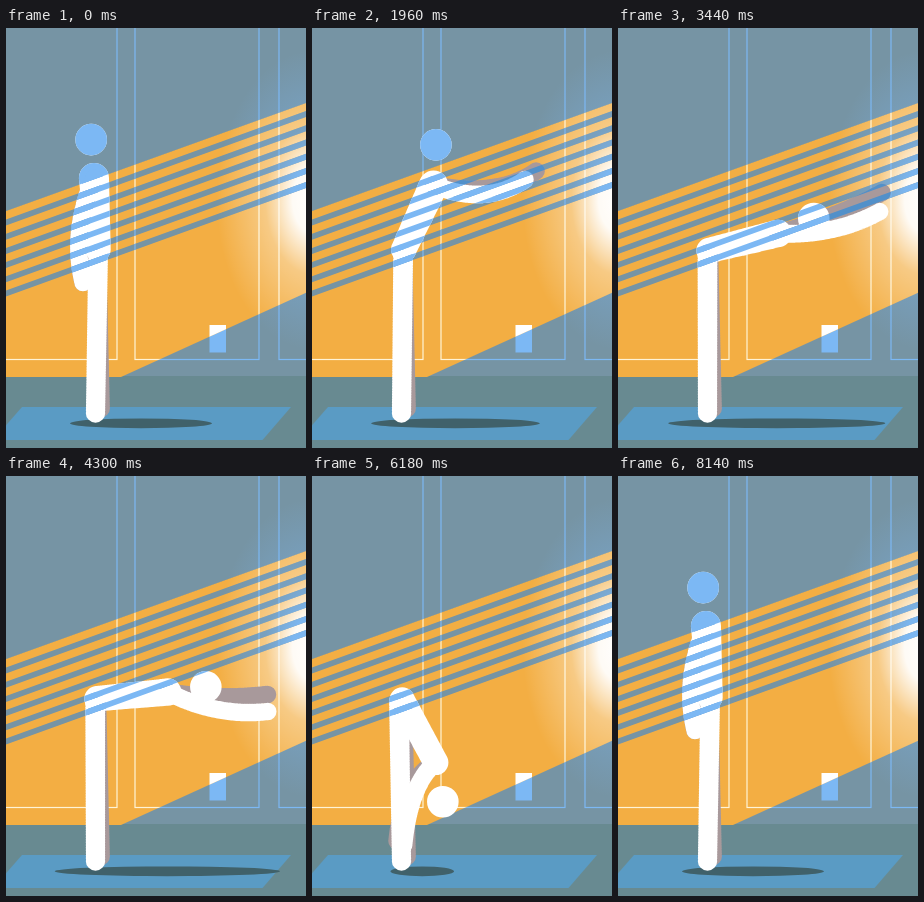
An HTML page with a canvas that plays this animation: 300x420 px, repeating every 8160 ms.

```html
<!DOCTYPE html>
<html lang="en">
<head>
<meta charset="utf-8">
<title>Forward fold</title>
<style>
html, body { margin: 0; width: 100%; height: 100%; overflow: hidden; background: #7694a4; }
canvas { display: block; width: 300px; height: 420px; }
</style>
</head>
<body>
<canvas id="stage" width="300" height="420"></canvas>
<script>
const ctx = document.getElementById('stage').getContext('2d');
const LOOP = 8160;
const LIT = { wall: '#f3ae43', line: '#fff3d6', front: '#ffffff', back: '#a8999b', glow: '255,255,255' };
const SHADE = { wall: '#7694a4', line: '#7cb8f4', front: '#7cb8f4', back: '#5290c9', glow: '124,184,244' };

// Angles run clockwise from straight up; far is how much the other arm shows
const stand = { torso: -3.3, head: -3.6, elbow: 203, bend: 59, hand: 186, arm: 105, far: 0, shadow: 206 };
const prayer = { torso: 2.5, head: 0, elbow: 230, bend: 53, hand: 189, arm: 70, far: 0, shadow: 211 };
const raise = { torso: 44, head: 32, elbow: 1, bend: 60, hand: -10, arm: 112, far: 27, shadow: 242 };
const table = { torso: 84.6, head: 83.8, elbow: 117, bend: 56, hand: 101, arm: 102, far: 17, shadow: 274 };
const fold = { torso: 135, head: 141.3, elbow: 234, bend: 44, hand: 203, arm: 91, far: 6, shadow: 189 };
const deep = { torso: 153, head: 159.5, elbow: 231, bend: 32, hand: 201, arm: 88, far: 8, shadow: 138 };
const keys = [
  [0, stand], [1400, prayer], [2500, raise], [2700, raise], [3750, table], [4300, table],
  [5160, fold], [6500, deep], [7270, deep], [8080, stand], [LOOP, stand]
];

// Monotone cubic interpolation of every joint value
function poseAt(t) {
  const i = keys.findIndex((key, k) => t < keys[k + 1][0]);
  const [from, a] = keys[i], [to, b] = keys[i + 1];
  const span = to - from, u = (t - from) / span, v = 1 - u;
  const pose = {};
  for (const name in a) {
    const slope = k => k < 0 || k > keys.length - 2 ? 0
      : (keys[k + 1][1][name] - keys[k][1][name]) / (keys[k + 1][0] - keys[k][0]);
    const tangent = k => {
      const p = slope(k - 1), q = slope(k);
      return p * q <= 0 ? 0 : 2 * p * q / (p + q);
    };
    pose[name] = a[name] * v * v * (1 + 2 * u) + b[name] * u * u * (3 - 2 * u)
      + span * u * v * (v * tangent(i) - u * tangent(i + 1));
  }
  return pose;
}

function polygon(path, ...points) {
  points.forEach(([x, y], i) => i ? path.lineTo(x, y) : path.moveTo(x, y));
  path.closePath();
  return path;
}

const light = polygon(new Path2D(), [0, 183], [300, 75], [300, 264.8], [115, 349], [0, 349]);
const shade = polygon(new Path2D(), [0, 0], [300, 0], [300, 75], [0, 183]);
for (let i = 0; i < 6; i++) {
  const left = 191.5 + i * 14.2, right = left - 108.4;
  polygon(shade, [0, left], [300, right], [300, right + 6], [0, left + 6]);
}

function clipped(path, draw) {
  ctx.save();
  ctx.clip(path);
  draw();
  ctx.restore();
}

function wall(c) {
  ctx.fillStyle = c.wall;
  ctx.fillRect(0, 0, 300, 420);
  ctx.strokeStyle = c.line;
  ctx.lineWidth = 1.2;
  for (const [x, w] of [[-20, 131], [129, 124], [273, 60]]) ctx.strokeRect(x, -10, w, 341.5);
  ctx.fillStyle = c.front;
  ctx.fillRect(203.5, 297, 16.5, 27.5);
  ctx.save();
  ctx.translate(308, 172);
  ctx.scale(0.65, 1);
  const glow = ctx.createRadialGradient(0, 0, 0, 0, 0, 150);
  for (const [stop, alpha] of [[0, 1], [0.22, 0.95], [0.5, 0.35], [1, 0]])
    glow.addColorStop(stop, `rgba(${c.glow},${alpha})`);
  ctx.fillStyle = glow;
  ctx.fillRect(-150, -150, 300, 300);
  ctx.restore();
}

function room() {
  wall(SHADE);
  ctx.fillStyle = '#688a91';
  ctx.fillRect(0, 348, 300, 72);
  clipped(light, () => {
    wall(LIT);
    clipped(shade, () => wall(SHADE));
  });
  ctx.fillStyle = '#5a9bc4';
  ctx.fill(polygon(new Path2D(), [16, 379], [285, 379], [256.5, 412], [-13, 412]));
}

// Round-ended limb along a quadratic curve, tapering from r0 to r1
function limb(a, c, b, r0, r1) {
  const steps = 60;
  ctx.beginPath();
  for (let i = 0; i <= steps; i++) {
    const u = i / steps, v = 1 - u, r = r0 * v + r1 * u;
    const [x, y] = [0, 1].map(k => a[k] * v * v + 2 * c[k] * u * v + b[k] * u * u);
    ctx.moveTo(x + r, y);
    ctx.arc(x, y, r, 0, 7);
  }
  ctx.fill();
}
const bone = (a, b, r0, r1) => limb(a, [(a[0] + b[0]) / 2, (a[1] + b[1]) / 2], b, r0, r1);

function reach([x, y], angle, length) {
  const a = angle * Math.PI / 180;
  return [x + Math.sin(a) * length, y - Math.cos(a) * length];
}

function figure(p, c) {
  // The hip shifts back and sinks as the torso folds
  const hip = [92 - p.torso * 0.012, 221 + p.torso * 0.02];
  const thigh = [92 - p.torso * 0.033, 226];
  const shoulder = reach(hip, p.torso, 71);
  const head = reach(hip, p.head, 109.5);
  const elbow = reach(shoulder, p.elbow, p.bend);
  const hand = reach(shoulder, p.hand, p.arm);
  const away = joint => reach(joint, 75 - p.torso * 0.9, p.far);

  ctx.fillStyle = c.back;
  limb(shoulder, away(elbow), away(hand), 9, 8.8);
  bone([91, 230], [94.5, 380], 9.5, 9.5);
  ctx.fillStyle = c.front;
  bone(thigh, [89.5, 385], 10, 9.7);
  bone(hip, shoulder, 12.7, 15 - p.torso * 0.016);
  limb(shoulder, elbow, hand, 9, 8.7);
  bone(head, head, 15.8, 15.8);
}

function frame(now) {
  const pose = poseAt(now % LOOP);
  room();
  const right = pose.shadow, left = 64 - (right - 206) * 0.225;
  ctx.fillStyle = '#40616a';
  ctx.beginPath();
  ctx.ellipse((left + right) / 2, 395.3, (right - left) / 2, 4.9, 0, 0, 7);
  ctx.fill();
  figure(pose, LIT);
  clipped(shade, () => figure(pose, SHADE));
}

const start = performance.now();
function tick() {
  frame(performance.now() - start);
  requestAnimationFrame(tick);
}
tick();
</script>
</body>
</html>
```
